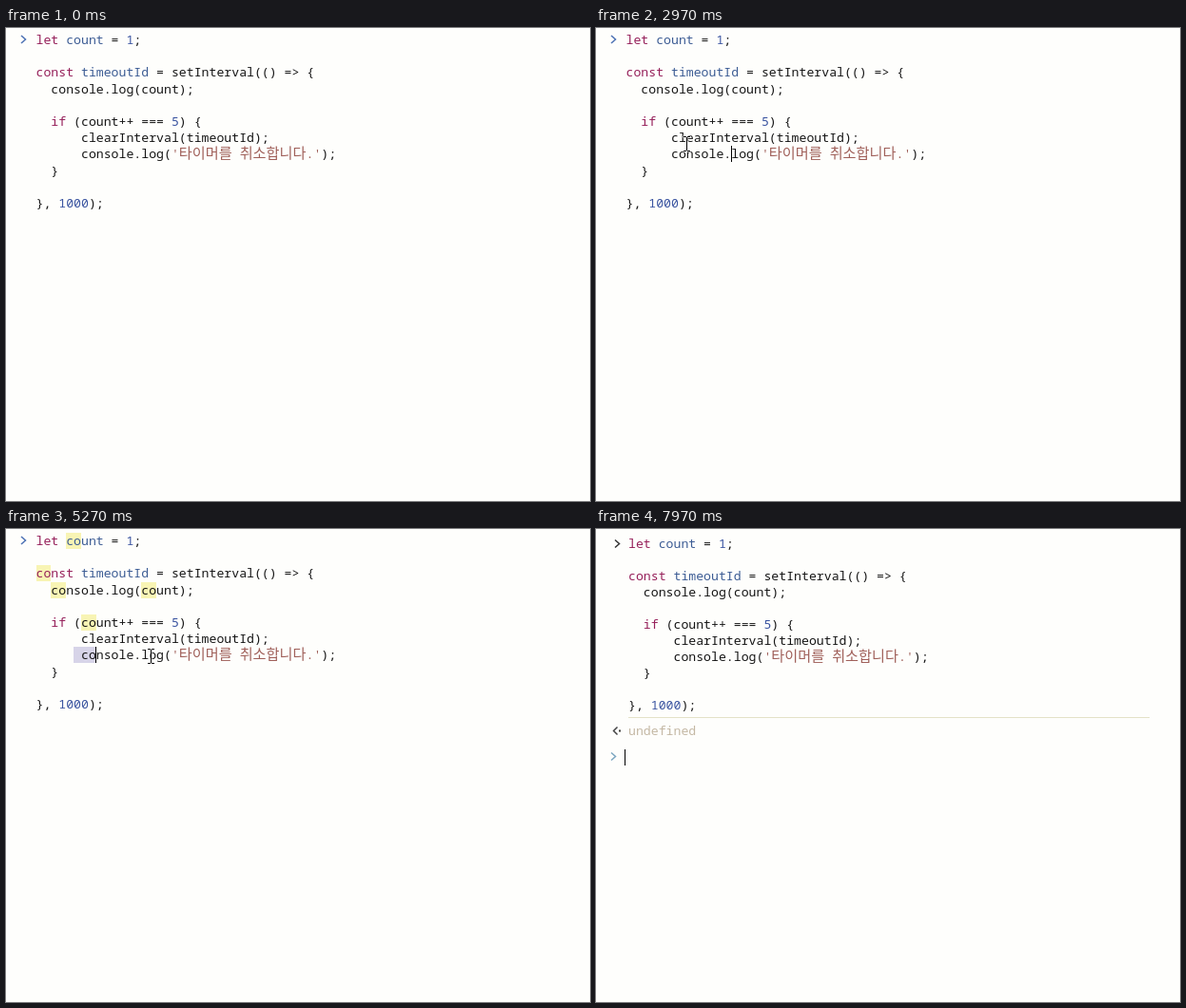
These frames come from a looping animation (614 by 498 pixels, 8 s). An HTML page with a canvas:

```html
<!DOCTYPE html>
<html lang="ko">
<head>
<meta charset="utf-8">
<style>
  html, body { margin: 0; width: 100%; height: 100%; overflow: hidden; background: #fefefc; }
  canvas { display: block; }
</style>
</head>
<body>
<canvas width="614" height="498"></canvas>
<script>
const ctx = document.querySelector('canvas').getContext('2d');
const LOOP = 8000, ENTER = 7470, POINTER_HIDDEN = 7750, DRAG_LAG = 48, BLINK = 530;
const MONO = '13.2px "Noto Sans Mono", "DejaVu Sans Mono", monospace';
const HANGUL = '300 15.2px "Noto Sans CJK KR", "Noto Sans CJK", sans-serif';
const INK = '#161616', KEYWORD = '#96205a', NUMBER = '#3a54a0', STRING = '#a0605a', NAME = '#3c5c94';

const code = `let count = 1;

const timeoutId = setInterval(() => {
  console.log(count);

  if (count++ === 5) {
      clearInterval(timeoutId);
      console.log('타이머를 취소합니다.');
  }

}, 1000);`.split('\n');

const editor = { x: 31.5, y: 4, pitch: 17.2 };
const echoed = { x: 34, y: 7, pitch: 17 };

// The pointer glides from one gesture to the next. A row places the caret;
// an end time makes the gesture a drag (with toX) or a rest.
const gestures = [
  { at: 60, x: 618, y: 150 },
  { at: 1160, end: 2460, x: 47, toX: 190, row: 5 },
  { at: 2700, x: 142, row: 7 },
  { at: 3430, end: 4130, x: 79, toX: 280, row: 6 },
  { at: 4600, x: 276, row: 6 },
  { at: 5205, end: 5845, x: 71, toX: 365, row: 7 },
  { at: 6300, end: 6650, x: 264, y: 234 },
  { at: 6950, x: 290, y: 297, row: 10 },
];

const easeOut = u => 1 - (1 - Math.min(1, u)) ** 3;
const mix = (a, b, k) => a + (b - a) * k;
const gestureY = g => g.y ?? editor.y + g.row * editor.pitch + 10;
const dragX = (g, t) => g.end ? mix(g.x, g.toX ?? g.x, easeOut((t - g.at) / (g.end - g.at))) : g.x;

function pointerAt(t) {
  const i = gestures.findLastIndex(g => g.at <= t);
  const from = gestures[i], to = gestures[i + 1];
  const left = from.end || from.at;
  const x = dragX(from, t), y = gestureY(from);
  if (!to || t < left) return [x, y];
  const k = easeOut((t - left) / (to.at - left));
  return [mix(x, to.x, k), mix(y, gestureY(to), k)];
}

function colorOf(token, previous) {
  if (/^(let|const|if)$/.test(token)) return KEYWORD;
  if (/^\d/.test(token)) return NUMBER;
  if (token[0] === "'") return STRING;
  return /^(let|const)$/.test(previous) ? NAME : INK;
}

function layout(line) {
  const glyphs = [], stops = [0];
  let x = 0, previous = '';
  for (const token of line.match(/'.*'|\w+|\s+|[^\w\s]/g) || []) {
    const color = colorOf(token, previous);
    for (const ch of token) {
      const font = ctx.font = /[가-힣]/.test(ch) ? HANGUL : MONO;
      glyphs.push({ ch, x, color, font });
      stops.push(x += ctx.measureText(ch).width);
    }
    if (token.trim()) previous = token;
  }
  return { glyphs, stops };
}
const rows = code.map(layout);

function nearestCol(row, x) {
  const distance = rows[row].stops.map(s => Math.abs(s + editor.x - x));
  return distance.indexOf(Math.min(...distance));
}

function fillCols(row, from, to, color) {
  const { stops } = rows[row];
  const left = Math.round(editor.x + stops[from]);
  ctx.fillStyle = color;
  ctx.fillRect(left, Math.round(editor.y + row * editor.pitch),
    Math.round(editor.x + stops[to]) - left, 17);
}

function drawCode(origin) {
  rows.forEach(({ glyphs }, i) => {
    const baseline = Math.round(origin.y + i * origin.pitch + 13);
    for (const g of glyphs) {
      ctx.font = g.font;
      ctx.fillStyle = g.color;
      ctx.fillText(g.ch, origin.x + g.x, baseline);
    }
  });
}

function drawCaret(x, y) {
  ctx.fillStyle = '#000';
  ctx.fillRect(Math.round(x), Math.round(y), 1, 17);
}

function chevron(x, y, color, width = 4.5) {
  ctx.beginPath();
  ctx.moveTo(x, y - 4);
  ctx.lineTo(x + width, y);
  ctx.lineTo(x, y + 4);
  ctx.strokeStyle = color;
  ctx.lineWidth = 1.5;
  ctx.stroke();
}

function drawSelection(row, from, to) {
  const query = code[row].slice(from, to).trim();
  if (query.length > 1) {
    code.forEach((line, i) => {
      for (let c = line.indexOf(query); c >= 0; c = line.indexOf(query, c + 1))
        fillCols(i, c, c + query.length, '#f8f4b4');
    });
  }
  fillCols(row, from, to, '#d7d4e8');
}

function drawEditor(t) {
  const caret = gestures.findLast(g => g.at <= t && g.row !== undefined);
  let head = 0;
  if (caret) {
    const anchor = nearestCol(caret.row, caret.x);
    head = nearestCol(caret.row, dragX(caret, Math.max(caret.at, t - DRAG_LAG)));
    if (head > anchor) drawSelection(caret.row, anchor, head);
  }
  drawCode(editor);
  chevron(16, 12, '#4a70b4');
  if (!caret) return;
  const changed = Math.min(t, caret.end || caret.at);
  if ((t - changed) % (2 * BLINK) < BLINK)
    drawCaret(editor.x + rows[caret.row].stops[head] - 0.5, editor.y + caret.row * editor.pitch);
}

function drawResult() {
  drawCode(echoed);
  chevron(20, 15.5, '#333');
  ctx.fillStyle = '#e4e2c8';
  ctx.fillRect(34, 198, 548, 1);
  chevron(22.5, 212.5, '#444', -4);
  ctx.fillRect(24, 211.5, 2, 2);
  ctx.fillStyle = '#444';
  ctx.fillRect(24, 211.5, 2, 2);
  ctx.font = MONO;
  ctx.fillStyle = '#c4b8a4';
  ctx.fillText('undefined', 34, 217);
  chevron(16, 239.5, '#7ba6c0');
  drawCaret(30, 232);
}

function drawIBeam(x, y) {
  const bars = (color, grow) => {
    const bar = (dx, dy, w, h) =>
      ctx.fillRect(x + dx - grow, y + dy - grow, w + 2 * grow, h + 2 * grow);
    ctx.fillStyle = color;
    bar(0, -7, 1, 14);
    for (const dx of [-3, 1]) for (const dy of [-8, 7]) bar(dx, dy, 3, 1);
  };
  bars('#fff', 0.5);
  bars('#000', 0);
}

const arrow = new Path2D('M.5 .5v16l4-3.5 2.5 6 2.5-1-2.5-6h5z');
function drawArrow(x, y) {
  ctx.save();
  ctx.translate(x, y);
  ctx.fillStyle = '#fff';
  ctx.fill(arrow);
  ctx.strokeStyle = '#000';
  ctx.lineWidth = 1;
  ctx.stroke(arrow);
  ctx.restore();
}

function draw(t) {
  ctx.fillStyle = '#fefefc';
  ctx.fillRect(0, 0, 614, 498);
  if (t < ENTER) drawEditor(t);
  else drawResult();
  if (t < gestures[0].at || t > POINTER_HIDDEN) return;
  const [x, y] = pointerAt(t).map(Math.round);
  if (y < 195) drawIBeam(x, y);
  else drawArrow(x, y);
}

let start;
function tick(now) {
  start ??= now;
  draw((now - start) % LOOP);
  requestAnimationFrame(tick);
}
requestAnimationFrame(tick);
</script>
</body>
</html>
```
